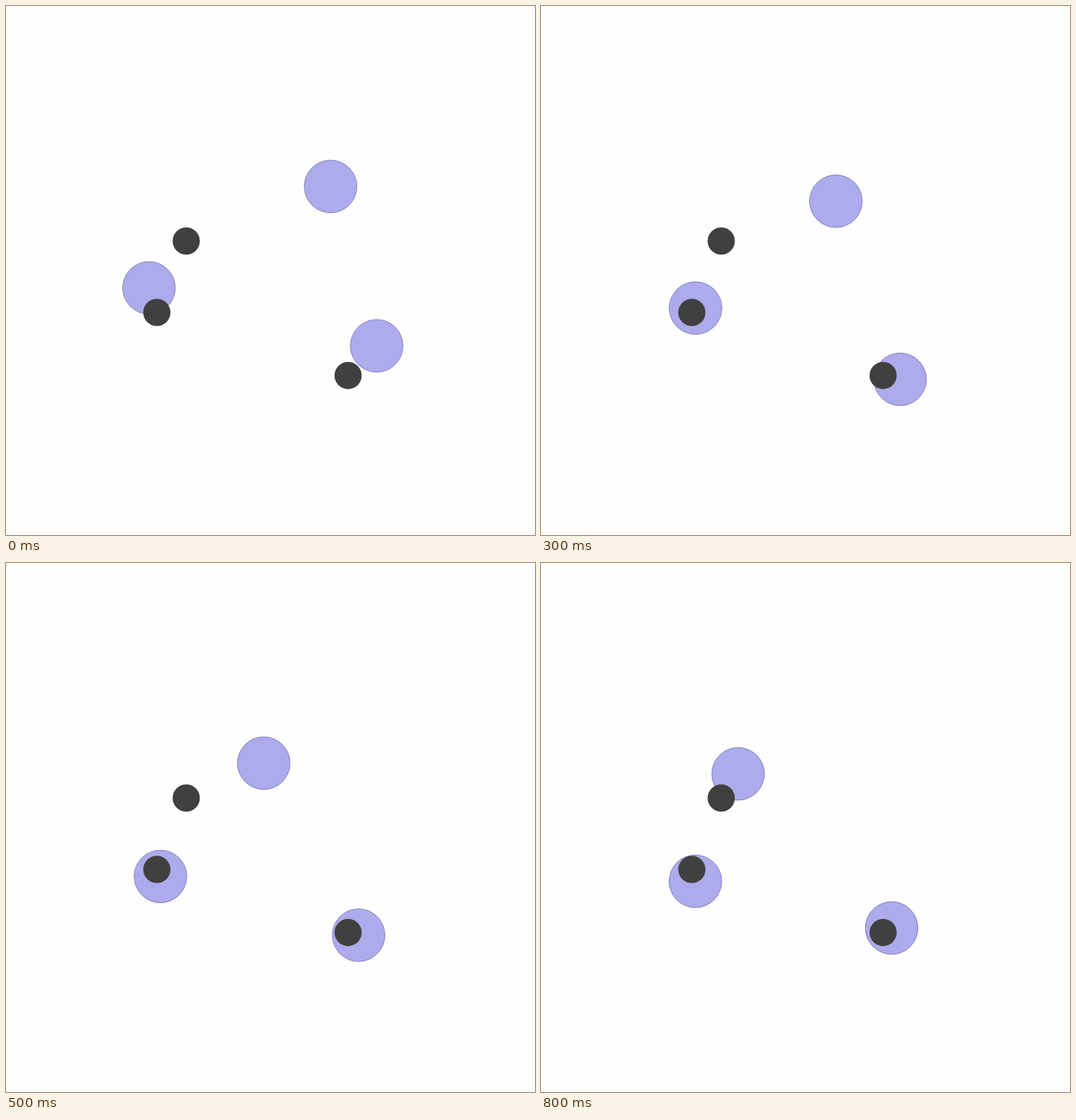
Animation, 700 px wide and 700 px high, one loop 900 ms. Source, as an HTML page:

```html
<!DOCTYPE html>
<html>
<head>
<meta charset="utf-8">
<style>
  html, body { margin: 0; width: 100%; height: 100%; overflow: hidden; background: #fefefe; }
  svg { display: block; width: 100%; height: 100%; }
  .ball { fill: #adabeb; stroke: #8583bd; }
  .dot { fill: #404040; }
</style>
</head>
<body>
<svg viewBox="0 0 700 700"></svg>
<script>
const STEP_MS = 100, STEPS = 9, LAST = STEPS - 1;
const svg = document.querySelector('svg');

function addCircle(className, r) {
  const circle = document.createElementNS('http://www.w3.org/2000/svg', 'circle');
  circle.setAttribute('class', className);
  circle.setAttribute('r', r);
  return svg.appendChild(circle);
}

function place(circle, [x, y]) {
  circle.setAttribute('cx', x);
  circle.setAttribute('cy', y);
}

const mix = (a, b, u) => a.map((v, i) => v + (b[i] - v) * u);

// Bezier point by repeated mixing of neighbouring control points.
function bezier(points, u) {
  if (points.length === 1) return points[0];
  return bezier(points.slice(1).map((p, i) => mix(points[i], p, u)), u);
}

// Straight legs between turning points; turns holds the step of each turn.
const turns = [0, 2, 3, 5, 6, LAST];
function zigzag(points, step) {
  const leg = Math.max(1, turns.findIndex(turn => turn >= step));
  const from = turns[leg - 1];
  return mix(points[leg - 1], points[leg], (step - from) / (turns[leg] - from));
}

const glide = [[429.5, 238.8], [422.4, 266], [326.3, 259.4], [260.8, 279]];
const leftDrift = [[189.2, 373], [198, 399.8], [204.5, 399.7], [204.4, 414.8], [200.6, 411], [204.3, 421.2]];
const rightDrift = [[490.5, 449.7], [481.8, 476.5], [475.2, 494], [466.6, 492.5], [455, 488.5], [464, 483]];

const motions = [
  step => bezier(glide, step / LAST),
  step => zigzag(leftDrift, step),
  step => zigzag(rightDrift, step)
];
const balls = motions.map(() => addCircle('ball', 34.8));

for (const spot of [[238.5, 311], [199.6, 405.5], [452.7, 488.9]]) {
  place(addCircle('dot', 18), spot);
}

const start = performance.now();
function tick() {
  const step = Math.floor((performance.now() - start) / STEP_MS) % STEPS;
  balls.forEach((ball, i) => place(ball, motions[i](step)));
  requestAnimationFrame(tick);
}
tick();
</script>
</body>
</html>
```
